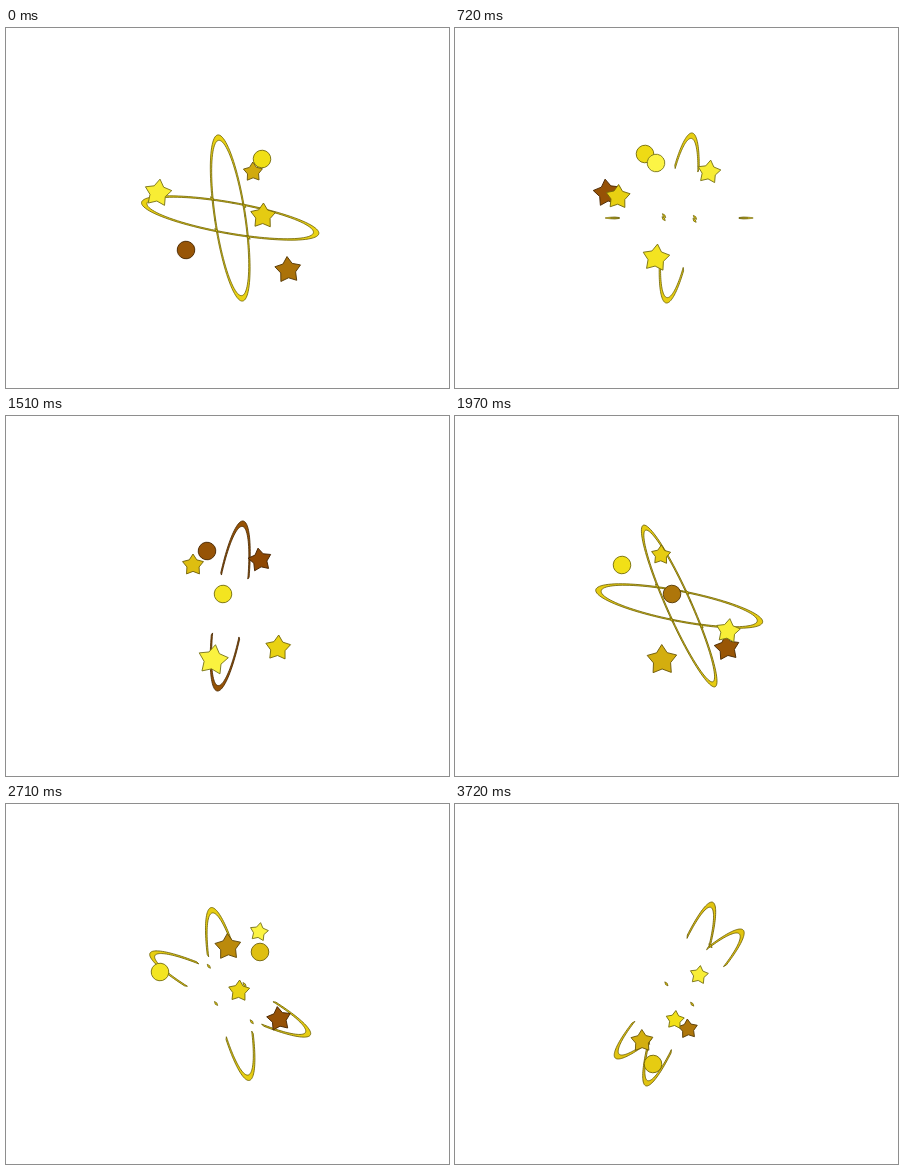
Write an HTML page that moves like this. It is 443 by 360 pixels and loops after 3.74 s.

```html
<!DOCTYPE html>
<html>
<head>
<meta charset="utf-8">
<style>
html, body { margin: 0; width: 100%; height: 100%; overflow: hidden; background: #fff; }
svg { display: block; width: 100vw; height: 100vh; }
</style>
</head>
<body>
<svg id="stage" viewBox="0 0 443 360" stroke-linejoin="round"></svg>
<script>
const LOOP = 3740, LIFE = 900, DOT = 8.8;
const CX = 224.2, CY = 190;
const stage = document.getElementById('stage');

// Old brown, through gold, to fresh pale yellow.
const RAMP = [[140, 68, 4], [162, 100, 8], [222, 190, 16], [240, 222, 20], [252, 245, 70]];

// Each wave releases its pieces one step apart: stars have a radius, dots do not.
const WAVES = [
  { start: -780, step: 140, spots: [[180, 222], [282, 242, 13.5], [247, 144, 10], [257, 188, 13], [256, 131], [152, 165, 14]] },
  { start: 395, step: 80, spots: [[163, 169, 12.5], [190, 126], [201, 230, 14], [254, 144, 12], [201, 135]] },
  { start: 1060, step: 140, spots: [[187, 149, 11], [272, 232, 13], [217, 178], [207, 244, 15.5], [206, 139, 10], [167, 149], [273, 215, 12.5]] },
  { start: 2130, step: 140, spots: [[222, 143, 13.5], [254, 148], [233, 187, 11], [154, 168], [253, 128, 9.5]] },
  { start: 3090, step: 140, spots: [[233, 225, 10], [187, 237, 11.5], [198, 260], [220, 216, 9.5], [244, 171, 9.5]] }
];

// Rings are [long radius, short radius, angle]; reach is how far the arcs
// extend from the tips, in degrees, at the start and end of the pose.
const POSES = [
  { end: 660, tall: [84, 15.7, 81.5], wide: [90, 16, 10] },
  { end: 1680, tall: [86, 15.4, 98.7], wide: [74, 2, 0], reach: [52, 72], wideReach: [32, -12], fade: .65 },
  { end: 2420, tall: [88.4, 12.8, 66], wide: [85, 15.5, 11] },
  { end: 3330, tall: [88.5, 16, 77.5], wide: [90, 15.5, 27], reach: [42, 100] },
  { end: LOOP, tall: [97.7, 15.6, 110], wide: [90.5, 16, -45], reach: [42, 54] }
];

const mix = (a, b, k) => a + (b - a) * k;
const rad = d => d * Math.PI / 180;
const poly = points => 'M' + points.map(p => p.map(v => v.toFixed(2)).join(' ')).join('L') + 'Z';

function turn([x, y], deg) {
  const c = Math.cos(rad(deg)), s = Math.sin(rad(deg));
  return [x * c - y * s, x * s + y * c];
}

function paint(level, width = .9) {
  const v = Math.min(.999, Math.max(0, level)) * (RAMP.length - 1), i = Math.floor(v);
  const rgb = RAMP[i].map((c, n) => mix(c, RAMP[i + 1][n], v - i));
  const css = dim => `rgb(${rgb.map(c => Math.round(c * dim))})`;
  return `fill="${css(1)}" stroke="${css(.5)}" stroke-width="${width}"`;
}

function starPath(r) {
  const corner = (_, i) => turn([0, i % 2 ? -r * .58 : -r], i * 36);
  return poly(Array.from({ length: 10 }, corner));
}

// Flat band between two ellipses, thick at the tips.
function band(a, b, mid, reach) {
  const outer = [], inner = [], n = 48;
  for (let i = 0; i <= n; i++) {
    const f = rad(mid + mix(-reach, reach, i / n));
    outer.push([a * Math.cos(f), b * Math.sin(f)]);
    inner.unshift([(a - 5.5) * Math.cos(f), (b - 1.1) * Math.sin(f)]);
  }
  return poly(outer.concat(inner));
}

function ring([a, b, angle], reach, level) {
  if (reach <= 0) return '';
  const span = Math.min(reach, 90);
  return `<path transform="translate(${CX} ${CY}) rotate(${angle})" ` +
    `d="${band(a, b, 0, span) + band(a, b, 180, span)}" ${paint(level, .8)}/>`;
}

// Points where the two rings cross.
function crossings({ tall, wide }) {
  const found = [];
  let was;
  for (let d = 0; d <= 360; d++) {
    const p = turn([tall[0] * Math.cos(rad(d)), tall[1] * Math.sin(rad(d))], tall[2]);
    const q = turn(p, -wide[2]);
    const inside = Math.hypot(q[0] / wide[0], q[1] / wide[1]) < 1;
    if (d && inside !== was) found.push([CX + p[0], CY + p[1]]);
    was = inside;
  }
  return found;
}

let begin = 0;
for (const p of POSES) {
  p.start = begin;
  begin = p.end;
  p.knots = crossings(p);
}

function rings(t) {
  const p = POSES.find(q => t < q.end);
  const k = (t - p.start) / (p.end - p.start);
  const { reach = [90, 90], wideReach = reach, fade = .12 } = p;
  const level = .66 - fade * k, side = mix(...wideReach, k);
  const knots = side > 0 ? p.knots : [];
  return ring(p.wide, side, level) + ring(p.tall, mix(...reach, k), level) +
    knots.map(([x, y]) => `<path d="M${x - 1.5} ${y - 2}l2.4 1.4l.8 2.6l-2.4 -1.2z" ${paint(level, .8)}/>`).join('');
}

const pieces = WAVES.flatMap(w => w.spots.map(([x, y, r], i) => ({
  x, y, birth: w.start + i * w.step, star: r && starPath(r)
})));

function piece({ x, y, birth, star }, t) {
  const age = (t - birth) / LIFE;
  if (age < 0 || age >= 1) return '';
  const look = paint(1 - age);
  return `<g transform="translate(${x} ${y}) rotate(${10 - 20 * age})">` +
    (star ? `<path d="${star}" ${look}/>` : `<circle r="${DOT}" ${look}/>`) + '</g>';
}

function draw(now) {
  const t = now % LOOP;
  stage.innerHTML = rings(t) + pieces.map(p => piece(p, t)).join('');
}

let first;
function tick(now) {
  first ??= now;
  draw(now - first);
  requestAnimationFrame(tick);
}
draw(0);
requestAnimationFrame(tick);
</script>
</body>
</html>
```
